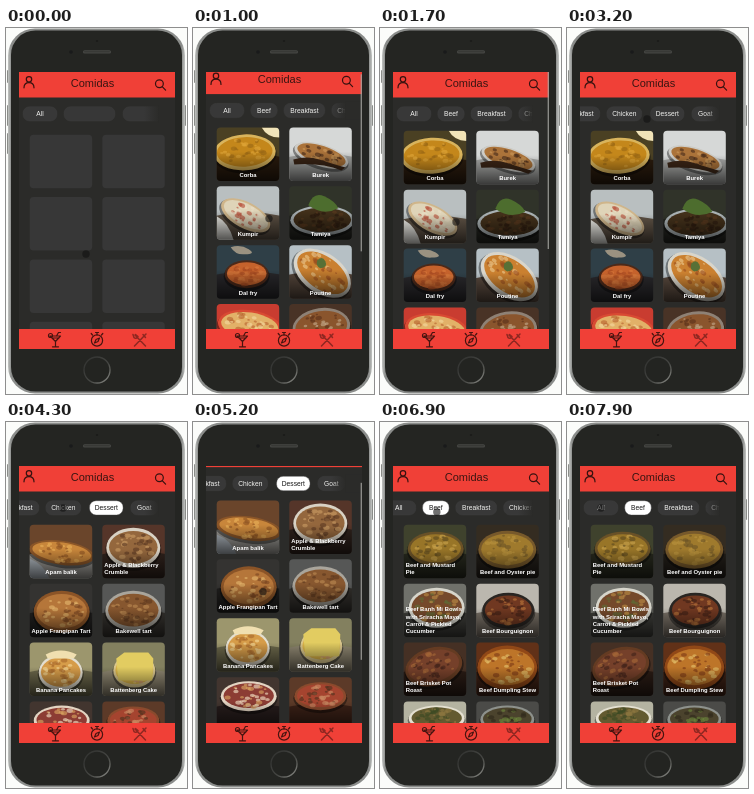
Recreate the animation shown at these times as an HTML page. Size 181 by 366 pixels, loop 8000 ms.

```html
<!DOCTYPE html>
<html lang="es">
<head>
<meta charset="utf-8">
<title>Comidas</title>
<style>
html, body { margin: 0; width: 100%; height: 100%; overflow: hidden; background: #fbfcfa; }
svg { display: block; width: 100%; height: 100%; }
text { font-family: "Liberation Sans", Arial, sans-serif; }
.chip text { font-size: 6.7px; text-anchor: middle; }
.label { font-size: 5.9px; font-weight: bold; fill: #fff; }
.line { fill: none; stroke-linecap: round; stroke-linejoin: round; }
</style>
</head>
<body>
<svg viewBox="0 0 181 366" preserveAspectRatio="none">
  <defs>
    <linearGradient id="edge"><stop offset="0" stop-color="#2b2b29" stop-opacity="0"/><stop offset="1" stop-color="#2b2b29"/></linearGradient>
    <linearGradient id="shade" x2="0" y2="1"><stop offset=".45" stop-opacity="0"/><stop offset="1" stop-opacity=".66"/></linearGradient>
    <linearGradient id="metal"><stop offset="0" stop-color="#c2c4c2"/><stop offset=".018" stop-color="#8b8d8b"/><stop offset=".982" stop-color="#8b8d8b"/><stop offset="1" stop-color="#c2c4c2"/></linearGradient>
    <linearGradient id="ring" x2="1" y2="1"><stop offset="0" stop-color="#30312f"/><stop offset=".6" stop-color="#454643"/><stop offset="1" stop-color="#93948f"/></linearGradient>
    <clipPath id="view"><rect x="13" y="44" width="156" height="257"/></clipPath>
    <clipPath id="card"><rect width="62.5" height="53.5" rx="4"/></clipPath>
    <filter id="soft" x="-10%" y="-10%" width="120%" height="120%"><feGaussianBlur stdDeviation=".5"/></filter>
  </defs>

  <rect width="181" height="366" fill="#fbfcfa"/>
  <g fill="#8b8d8a">
    <rect x="1" y="42" width="3" height="13" rx="1"/>
    <rect x="1" y="77" width="3" height="21" rx="1"/>
    <rect x="1" y="105" width="3" height="21" rx="1"/>
    <rect x="177" y="77" width="3" height="21" rx="1"/>
  </g>
  <rect x="2" y=".5" width="177" height="365" rx="27" fill="url(#metal)"/>
  <rect x="5" y="2.5" width="171" height="361" rx="24.500" fill="#242522"/>
  <circle cx="91" cy="13" r="1.100" fill="#1a1b19"/>
  <circle cx="65" cy="24" r="1.800" fill="#191a1b"/>
  <rect x="77" y="22.300" width="28" height="3.200" rx="1.600" fill="#474845"/>
  <rect x="78" y="22.900" width="26" height="1.600" rx=".8" fill="#383936"/>
  <circle cx="91" cy="342" r="13" fill="#232421" stroke="url(#ring)" stroke-width="1.300"/>

  <rect x="13" y="44" width="156" height="277" fill="#2b2b29"/>
  <g clip-path="url(#view)">
    <g id="page">
      <g id="blank"></g>
      <g id="photos"></g>
      <g id="chips"></g>
      <rect x="138" y="77" width="15" height="18" fill="url(#edge)"/>
      <rect x="152.500" y="77" width="16.500" height="18" fill="#2b2b29"/>
      <rect x="13" y="44" width="156" height="25.500" fill="#f04037"/>
      <text x="86.500" y="58.800" font-size="11" text-anchor="middle" fill="#3a1512">Comidas</text>
      <g class="line" stroke="#35110f" stroke-width="1.200">
        <circle cx="23" cy="51.300" r="2.700"/>
        <path d="M18 59.800q0-5.200 5-5.200t5 5.200"/>
        <circle cx="153.400" cy="55.700" r="3.900"/>
        <path d="M156.200 58.600l3.400 3.500"/>
      </g>
    </g>
    <rect id="bar" x="167.700" width="1.100" height="177" fill="#a3a39f"/>
  </g>

  <rect x="13" y="301" width="156" height="20" fill="#f04037"/>
  <g class="line" stroke="#471410" stroke-width="1.200">
    <path d="M44 308h10.500l-5 5.500zM49.500 313.500v5M46.500 318.800h6M46 310h7M50.500 308l2-3.500h2"/>
    <circle cx="44.500" cy="307.500" r="2"/>
    <circle cx="91" cy="312.500" r="5.600"/>
    <path d="M88.500 315l1.500-3.500 3.500-1.500-1.500 3.500zM91 307v-2.500M89.500 304.500h3M86.500 307l-1.300-1.500M95.500 307l1.300-1.500"/>
  </g>
  <g class="line" stroke="#8e2721" stroke-width="1.500">
    <path d="M129 307l10.500 11M140 306l-11.500 12M137 306.500l2.500 3M128 309.500q2 2 4-1M128 309.500l-1-3M132 308.500l-2.500-2"/>
  </g>
  <circle id="touch" r="3.700" fill="#111" fill-opacity=".6"/>
</svg>

<script>
const LOOP = 8000;
const $ = id => document.getElementById(id);

function add(parent, tag, attrs = {}, text) {
  const el = document.createElementNS("http://www.w3.org/2000/svg", tag);
  for (const k in attrs) el.setAttribute(k, attrs[k]);
  if (text) el.textContent = text;
  parent.appendChild(el);
  return el;
}

const clamp = v => Math.max(0, Math.min(1, v));
const easeOut = v => 1 - (1 - clamp(v)) ** 3;
const smooth = v => (v = clamp(v), v * v * (3 - 2 * v));
const mix = (a, b, k) => a + (b - a) * k;
const ramp = (t, from, to) => smooth((t - from) / (to - from));
const grey = v => `rgb(${[v, v, v].map(Math.round)})`;

function random(seed) {
  return () => (seed = (seed * 16807) % 2147483647) / 2147483647;
}

// name | backdrop, table, dish, food, two garnishes | dish centre, radii, tilt | path drawn on top
const menus = [
  { at: 100, hide: 3600, dishes: [
    "Corba|#4a4023 #2a1b0d #d9b45c #c4871b #dfa437 #9d6a16|28 25 31 18 -3|#f1e3b8 M45 0h20v10q-14 1-20-10",
    "Burek|#d6d8d7 #a5a6a4 #cdccc7 #ab733a #c99757 #4a2d1a|32 28 28 11 18|#3b2516 M4 32q14-4 26 0t26 8l-4 3q-20-8-47-6z",
    "Kumpir|#b9bfc0 #5d5144 #cfb58a #dfd4b8 #b8513c #e9ddc4|29 29 27 13 28|#ecebe5 M0 30q12 6 17 24h-17z",
    "Tamiya|#303329 #23241f #a9b1b3 #42301a #5b3a1e #2d1c10|33 34 32 15 0|#4d6d2e M19 19q5-14 16-9t14 12q-15 8-30-3",
    "Dal fry|#2f3f47 #28272a #4c2919 #c5622c #d9793c #a94c22|30 29 22 14 0|#9b9281 M14 2q10-3 18 2t-4 5q-9 1-14-7",
    "Poutine|#b6c0c5 #55463b #d9d5ca #ca8030 #e9c58a #9c5122|33 28 32 20 35|#587036 M28 15q5-5 8 1t-5 7q-5-2-3-8",
    "Lasagne|#c93c30 #9e3326 #d94a33 #e2b168 #f2d79d #b86531|33 22 32 16 8|#e9e2d5 M0 30q14 3 18 24h-18z",
    "Donuts|#493326 #35261d #8e8175 #8a552d #c2a788 #5c331c|32 23 29 19 -8",
    "Dumplings|#70655a #413a34 #d9d2c6 #d4b27e #ead6ae #9b693d|31 27 27 17 0",
    "Kafteji|#4b3d32 #302620 #cfc5b4 #a85c29 #d09845 #536733|32 27 28 18 0" ] },
  { at: 3900, hide: 6200, dishes: [
    "Apam balik|#6a452b #9b9994 #8a5528 #c8863b #e6ad58 #8f5423|32 28 33 12 8|#aeb6bd M0 34q14 5 20 20h-20z",
    "Apple & Blackberry/Crumble|#553529 #2e211b #d9d2c4 #94673d #c79a63 #5e3a24|31 23 27 20 0",
    "Apple Frangipan Tart|#343331 #201f1e #8b5427 #b5763a #e2b36c #7b4722|32 28 28 21 0",
    "Bakewell tart|#565756 #33302c #a9a59c #87572f #b98750 #5e391e|31 27 28 20 0",
    "Banana Pancakes|#9c966d #696549 #e4dfd0 #d69c49 #f2d797 #a96a2c|31 30 22 18 0|#f0dfb0 M16 12q15-8 31 0l-3 4h-26z",
    "Battenberg Cake|#83805f #8b836e #d9c68c #dbb448 #e9cf73 #d39a80|32 28 21 17 0|#e2cc61 M14 16l8-6h24l5 6-1 22h-34z",
    "Fried Pastry|#42352f #261c1b #e3d4c2 #8c3c34 #d7a160 #f0dcc2|32 19 28 15 0",
    "Blackberry Fool|#5c3a28 #3a2016 #8a4a2d #a5442f #52331f #c98a62|31 19 26 14 0",
    "Bread and Butter/Pudding|#6b5b46 #40352a #d8cfbf #bd8038 #e3b565 #75441f|31 25 28 18 0",
    "Ricotta Pudding|#77716a #45403b #dfdad0 #d5a95f #eed6a0 #9a632c|32 26 26 17 0" ] },
  { at: 6380, hide: LOOP, dishes: [
    "Beef and Mustard/Pie|#3f422d #25271c #695127 #987528 #c6a04a #5e4a1f|32 24 28 17 0",
    "Beef and Oyster pie|#342c21 #211d18 #77592b #9f7a2d #b9923e #6e5626|31 25 29 19 0",
    "Beef Banh Mi Bowls/with Sriracha Mayo,/Carrot & Pickled/Cucumber|#70716b #3a3a36 #d6d5cb #75492b #b98a43 #5f6a35|33 24 28 20 0",
    "Beef Bourguignon|#bbb7ae #756d63 #292522 #703821 #b9743b #3f2015|32 27 26 18 0",
    "Beef Brisket Pot/Roast|#453024 #291b14 #643b22 #75402a #a56738 #42231a|30 24 29 19 -15",
    "Beef Dumpling Stew|#613118 #3b2014 #914817 #bd7529 #e4c06b #7f3c17|31 25 30 22 0",
    "Beef Lo Mein|#b4b3a1 #8d8d7c #e4e0d1 #635a30 #3c4a24 #8f7840|33 17 28 13 0",
    "Beef Mechado|#4b4b48 #363733 #8d918c #4b432d #6b843c #2f291c|31 18 27 14 0" ] }
];

const slot = (i, top, step) => [i % 2 ? 96.3 : 23.7, top + step * (i >> 1)];

function makeDish(parent, spec, i, seed) {
  const [name, tones, place, topping] = spec.split("|");
  const [back, table, dish, food, light, dark] = tones.split(" ");
  const [cx, cy, rx, ry, tilt] = place.split(" ").map(Number);
  const rnd = random(seed);
  const [x, y] = slot(i, 102.8, 58.9);
  const card = add(parent, "g", { transform: `translate(${x} ${y})`, "clip-path": "url(#card)" });
  const art = add(card, "g", { filter: "url(#soft)" });
  add(art, "rect", { x: -3, y: -3, width: 70, height: 60, fill: back });
  add(art, "path", { d: "M-3 30q35-8 70 0v30h-70z", fill: table });
  const plate = add(art, "g", { transform: `rotate(${tilt} ${cx} ${cy})` });
  const oval = (x, y, a, b, fill, opacity = 1) =>
    add(plate, "ellipse", { cx: x, cy: y, rx: a, ry: b, fill, opacity });
  oval(cx, cy + 2, rx + 1, ry + 1, "#000", 0.4);
  oval(cx, cy, rx, ry, dish);
  oval(cx, cy - 0.5, rx * 0.9, ry * 0.82, food);
  for (let n = 0; n < 38; n++) {
    const a = rnd() * 6.283, d = Math.sqrt(rnd()) * 0.76;
    const size = 0.7 + rnd() * 1.5;
    oval(cx + Math.cos(a) * d * rx, cy + Math.sin(a) * d * ry, size * 1.5, size, n % 2 ? light : dark, 0.65);
  }
  if (topping) {
    const [fill, ...d] = topping.split(" ");
    add(art, "path", { d: d.join(" "), fill });
  }
  add(card, "rect", { width: 63, height: 54, fill: "url(#shade)" });
  const lines = name.split("/");
  const wrapped = lines.length > 1;
  lines.forEach((line, n) => add(card, "text", {
    class: "label", x: wrapped ? 2 : 31.3, y: 49.4 - 7.2 * (lines.length - 1 - n),
    "text-anchor": wrapped ? "start" : "middle"
  }, line));
  return card;
}

const cards = menus.map((menu, m) => {
  const g = add($("photos"), "g");
  return menu.dishes.map((spec, i) => makeDish(g, spec, i, 977 + m * 1301 + i * 83));
});

for (let i = 0; i < 8; i++) {
  const [x, y] = slot(i, 106.8, 62.3);
  add($("blank"), "rect", { x, y, width: 62.5, height: 53.5, rx: 4 });
}

function makeChip(name, x, width) {
  const g = add($("chips"), "g", { class: "chip" });
  const box = add(g, "rect", { x: x - width / 2, y: 78.7, width, height: 14.3, rx: 6.5, stroke: "#41413f", "stroke-width": 0.4 });
  const label = add(g, "text", { x, y: 88 }, name);
  return { g, box, label, name };
}

const chips = [["All", 34, 34], ["Beef", 71, 26.5], ["Breakfast", 111.4, 41], ["Chicken", 156.3, 35],
  ["Dessert", 199.3, 33.5], ["Goat", 237.3, 27]].map(c => makeChip(...c));
const emptyChips = [makeChip("", 83.5, 51), makeChip("", 142.5, 51)];

const touchPath = [[0, 80, 226], [700, 80, 226], [960, 76, 194], [1300, 76, 109], [1480, 76, 109],
  [1700, 76, 194], [2300, 150, 140], [2480, 150, 91], [2800, 80, 91], [3200, 80, 91], [3480, 100, 88],
  [3800, 100, 88], [4300, 57, 86], [4500, 57, 86], [4650, 70, 194], [4920, 70, 109], [5020, 70, 109],
  [5300, 70, 194], [5430, 50, 90], [5780, 132, 90], [6100, 48, 89], [6850, 55, 90], [7100, 72, 90],
  [7300, 72, 92], [7550, 82, 108], [7900, 34, 86], [LOOP + 1, 34, 86]];

function touchAt(t) {
  const n = touchPath.findIndex(p => p[0] > t);
  const [t0, x0, y0] = touchPath[n - 1], [t1, x1, y1] = touchPath[n];
  const k = ramp(t, t0, t1);
  return [mix(x0, x1, k), mix(y0, y1, k)];
}

const chipScroll = t =>
  99 * easeOut((t - 2480) / 340) - 82 * ramp(t, 5430, 5780) - 17 * ramp(t, 6850, 7100);

const pageScroll = t =>
  85 * (ramp(t, 960, 1300) - ramp(t, 1480, 1700) + ramp(t, 4650, 4920) - ramp(t, 5020, 5300));

const barOpacity = t =>
  ramp(t, 100, 300) - ramp(t, 1800, 2300) + ramp(t, 4600, 4680) - ramp(t, 5350, 5700);

function picked(name, t) {
  if (name === "Dessert") return clamp((t - 3480) / 130) - clamp((t - 6170) / 130);
  return name === "Beef" ? clamp((t - 6190) / 140) : 0;
}

function draw(t) {
  const loaded = t >= menus[0].at;
  const pulse = grey(mix(55, 67, 0.5 - 0.5 * Math.cos(t * 2 * Math.PI / 1800)));
  const shown = menus.findIndex(m => t >= m.at && t < m.hide);
  $("blank").setAttribute("fill", pulse);
  $("blank").style.display = shown < 0 ? "" : "none";
  cards.forEach((set, m) => {
    set[0].parentNode.style.display = m === shown ? "" : "none";
    if (m === shown) set.forEach((card, i) =>
      card.setAttribute("opacity", easeOut((t - menus[m].at - i * 15) / 300)));
  });

  const shift = chipScroll(t);
  chips.forEach((chip, i) => {
    const k = picked(chip.name, t);
    chip.g.style.display = loaded || !i ? "" : "none";
    chip.g.setAttribute("transform", `translate(${-shift} 0)`);
    chip.box.setAttribute("fill", grey(mix(56, 255, k)));
    chip.label.setAttribute("fill", k > 0.35 ? "#171717" : "#f2f2f0");
  });
  emptyChips.forEach(chip => {
    chip.g.style.display = loaded ? "none" : "";
    chip.box.setAttribute("fill", pulse);
  });

  const scroll = pageScroll(t);
  $("page").setAttribute("transform", `translate(0 ${-scroll})`);
  $("bar").setAttribute("y", 44 + scroll * 0.69);
  $("bar").setAttribute("opacity", barOpacity(t));
  const [x, y] = touchAt(t);
  $("touch").setAttribute("cx", x);
  $("touch").setAttribute("cy", y);
}

const start = performance.now();
function tick() {
  draw((performance.now() - start) % LOOP);
  requestAnimationFrame(tick);
}
tick();
</script>
</body>
</html>
```
